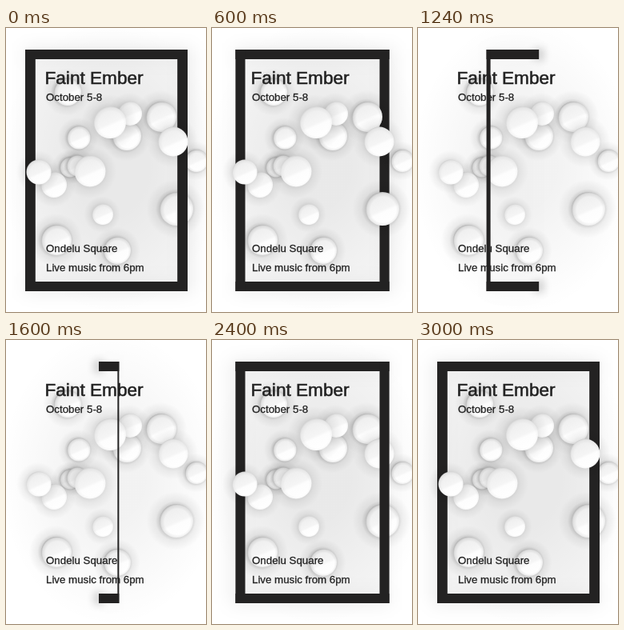
Write an HTML page that moves like this. It is 250 px wide and 355 px high and loops after 3.04 s.

```html
<!DOCTYPE html>
<html lang="en">
<head>
<meta charset="utf-8">
<title>Poster</title>
<style>
  html, body { margin: 0; width: 100%; height: 100%; overflow: hidden; background: #fff; }
  svg { display: block; width: 100vw; height: 100vh; }
  text { font: 13.3px "Liberation Sans", Arial, sans-serif; fill: #222; stroke: #222; stroke-width: .3px; }
  .title { font-size: 22.6px; stroke-width: .55px; }
  .bar { fill: #232222; }
</style>
</head>
<body>
<svg viewBox="0 0 250 355">
  <defs>
    <linearGradient id="body" x1=".28" y1="0" x2=".72" y2="1">
      <stop offset="0" stop-color="#ececec"/>
      <stop offset=".52" stop-color="#f5f5f5"/>
      <stop offset=".6" stop-color="#fdfdfd"/>
      <stop offset="1" stop-color="#fff"/>
    </linearGradient>
    <radialGradient id="nearRim" cx=".53" cy=".54" r=".55">
      <stop offset=".7" stop-opacity="0"/>
      <stop offset=".9" stop-opacity=".04"/>
      <stop offset="1" stop-opacity=".13"/>
    </radialGradient>
    <radialGradient id="deepRim" cx=".53" cy=".53" r=".54">
      <stop offset=".7" stop-opacity="0"/>
      <stop offset=".9" stop-opacity=".08"/>
      <stop offset="1" stop-opacity=".26"/>
    </radialGradient>
    <radialGradient id="nearHalo">
      <stop offset=".5" stop-opacity=".12"/>
      <stop offset=".7" stop-opacity=".05"/>
      <stop offset="1" stop-opacity="0"/>
    </radialGradient>
    <radialGradient id="deepHalo">
      <stop offset=".52" stop-opacity=".2"/>
      <stop offset=".68" stop-opacity=".06"/>
      <stop offset="1" stop-opacity="0"/>
    </radialGradient>
    <radialGradient id="haze">
      <stop offset=".3" stop-opacity=".05"/>
      <stop offset="1" stop-opacity="0"/>
    </radialGradient>
    <filter id="soft" filterUnits="userSpaceOnUse" x="-60" y="-60" width="370" height="475">
      <feGaussianBlur stdDeviation="11"/>
    </filter>
    <filter id="tight" filterUnits="userSpaceOnUse" x="-60" y="-60" width="370" height="475">
      <feGaussianBlur stdDeviation="5"/>
    </filter>
  </defs>
  <ellipse cx="132" cy="172" rx="140" ry="185" fill="url(#haze)"/>
  <g filter="url(#soft)">
    <rect id="fill" y="27" height="302"/>
    <path id="shade" fill="none" stroke="#000" stroke-width="14"/>
  </g>
  <g id="contact" filter="url(#tight)">
    <rect x="-7" y="25" width="14" height="16"/>
    <rect x="-7" y="315" width="14" height="16"/>
  </g>
  <g id="scene">
    <g id="words">
      <text class="title" x="48.5" y="70">Faint Ember</text>
      <text x="50" y="91">October 5-8</text>
      <text x="50" y="280">Ondelu Square</text>
      <text x="50" y="304">Live music from 6pm</text>
    </g>
  </g>
</svg>
<script>
const $ = id => document.getElementById(id);
const LOOP = 3040, TURN = 3000, STEP = 40;
const CX = 125.5, OUTER = 101.5, INNER = 88.7, TOP = 27, BOTTOM = 329, THICK = 12, WALL = 60;

// x, y, radius, depth of the front surface
const balls = [
  [77, 80, 17, -45], [91, 137, 14.5, -40], [63, 265, 19, -41], [139, 278, 17, -42],
  [238, 166, 14, -30], [80, 174, 12.5, -35], [89, 172, 13, -22], [194, 111, 19, -20],
  [213, 226, 21, -15], [151, 135, 18, -14], [121, 233, 13, -11], [155, 107, 15, -10],
  [60, 196, 16, 5], [209, 142, 18.5, 15], [105, 179, 19.5, 28], [130, 118, 20, 30],
  [41, 180, 15.5, 40]
];

function make(name, attrs, parent) {
  const el = document.createElementNS("http://www.w3.org/2000/svg", name);
  set(el, attrs);
  if (parent) parent.append(el);
  return el;
}
function set(el, attrs) {
  for (const key in attrs) el.setAttribute(key, attrs[key]);
}

function makeBall([x, y, r, z]) {
  const el = make("g", {});
  const kind = z < -12 ? "deep" : "near";
  make("circle", { cx: x - 1, cy: y, r: r * 1.75, fill: `url(#${kind}Halo)` }, el);
  for (const paint of ["body", kind + "Rim"]) {
    make("circle", { cx: x, cy: y, r, fill: `url(#${paint})` }, el);
  }
  return { el, z };
}
const makeBar = () => ({ el: make("rect", { class: "bar" }), z: 0 });

const front = makeBar(), back = makeBar(), upper = makeBar(), lower = makeBar();
const items = [...balls.map(makeBall), { el: $("words"), z: 45 }, front, back, upper, lower];

function place(bar, a, b, y, height) {
  set(bar.el, { x: Math.min(a, b), y, width: Math.abs(b - a), height });
}

function draw(time) {
  const t = Math.min(1, Math.floor(time % LOOP / STEP) * STEP / TURN);
  const angle = Math.PI * t * t * (3 - 2 * t);
  const sin = Math.sin(angle), cos = Math.cos(angle);
  const at = r => CX + r * cos;

  // The far half sinks into the wall
  const reach = Math.min(OUTER, WALL / Math.max(sin, 1e-6));
  const near = at(-OUTER), far = at(reach);
  const height = BOTTOM - TOP;
  place(front, near, at(-INNER), TOP, height);
  place(back, at(Math.min(INNER, reach)), far, TOP, height);
  place(upper, near, far, TOP, THICK);
  place(lower, near, far, BOTTOM - THICK, THICK);
  front.z = 95 * sin;
  back.z = -95 * sin;

  // Soft shadow of the frame on the wall
  const flat = cos * cos;
  const side = reach > INNER ? `V${BOTTOM - 6}` : `M${far} ${BOTTOM - 6}`;
  set($("fill"), { x: Math.min(near, far), width: Math.abs(far - near), "fill-opacity": .04 * flat });
  set($("shade"), {
    d: `M${near} ${TOP + 6}H${far}${side}H${near}`,
    "stroke-opacity": .02 + .04 * flat
  });
  set($("contact"), {
    transform: `translate(${far} 0)`,
    opacity: reach < OUTER ? .14 : 0
  });

  items.sort((a, b) => a.z - b.z);
  $("scene").append(...items.map(item => item.el));
}

const start = performance.now();
function tick() {
  draw(performance.now() - start);
  requestAnimationFrame(tick);
}
tick();
</script>
</body>
</html>
```
